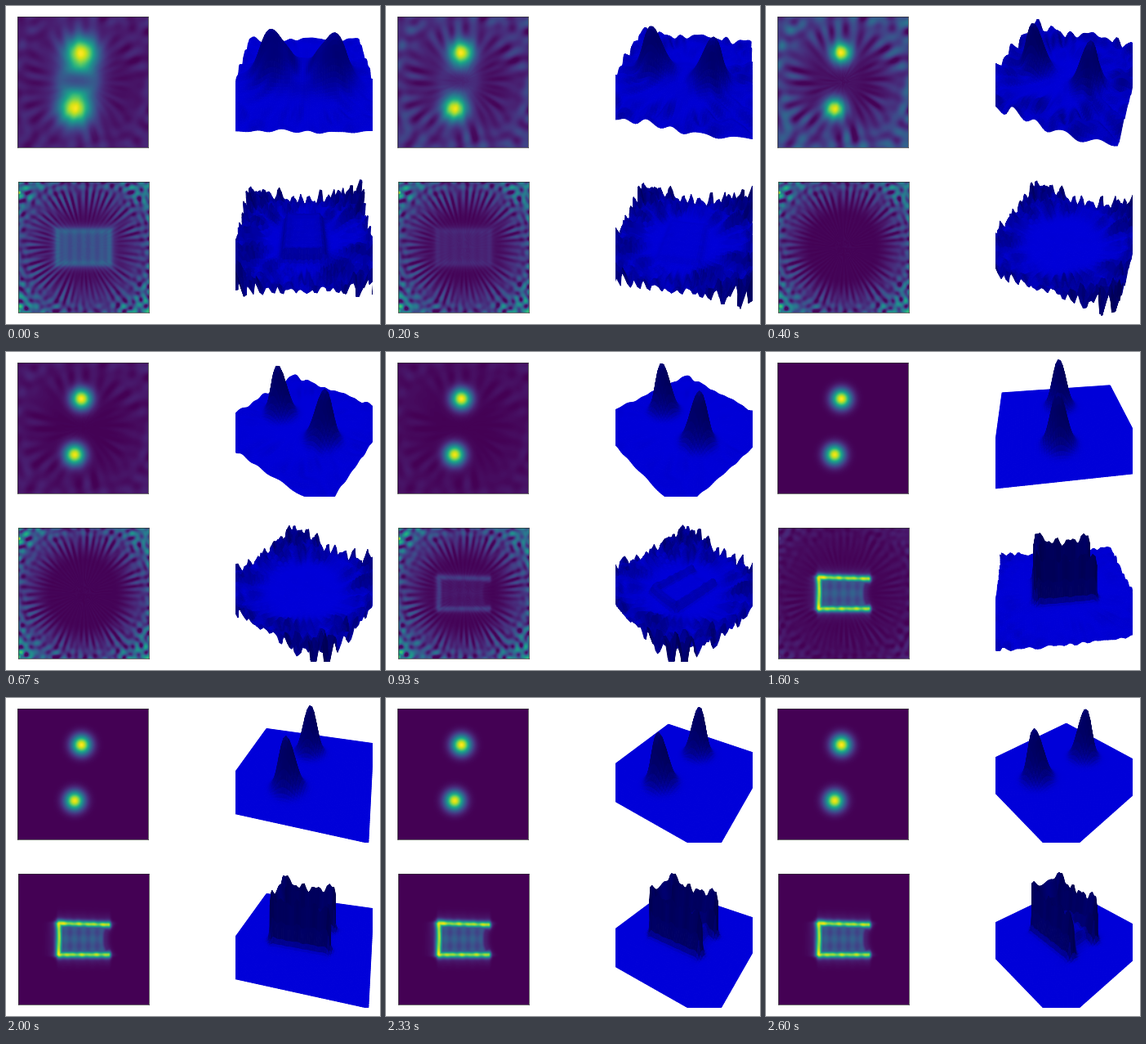
Animation of 458 by 389 pixels, one loop 2.67 s. Source, as a matplotlib script:

```python
import numpy as np
import matplotlib.pyplot as plt
from matplotlib.animation import FuncAnimation

W, H, DPI = 458, 389, 100
FRAMES, LOOP_MS = 40, 2670
TURN = np.radians(3.6)          # camera turn per frame
N = 129

axis = np.linspace(-1, 1, N)
P, Q = np.meshgrid(axis, axis)  # P to the right, Q downwards
R, PHI = np.hypot(P, Q), np.arctan2(Q, P)


def smooth(lo, hi, x):
    t = np.clip((x - lo) / (hi - lo), 0, 1)
    return t * t * (3 - 2 * t)


def bump(p, q, s):
    return np.exp(-((P - p) ** 2 + (Q - q) ** 2) / (2 * s * s))


def waves(rng, m_range, k_range, count=36):
    """Radial streaks that turn into round speckles near the corners."""
    rays, spots = np.zeros_like(P), np.zeros_like(P)
    for _ in range(count):
        m, ph = rng.integers(*m_range), rng.uniform(0, 2 * np.pi, 2)
        rays += np.cos(m * PHI + rng.uniform(-9, 9) * R + ph[0])
        k, d = rng.uniform(*k_range), rng.uniform(0, 2 * np.pi)
        spots += np.cos(k * (P * np.cos(d) + Q * np.sin(d)) + ph[1])
    mix = smooth(0.75, 1.15, R)
    return ((1 - mix) * rays + mix * spots) / np.sqrt(count / 2)


rng = np.random.default_rng(11)
coarse = [waves(rng, (14, 30), (14, 32)) for _ in range(2)]
fine = [waves(rng, (38, 58), (30, 58)) for _ in range(2)]


def drift(pair, i, contrast):
    a = 0.05 * i
    n = np.cos(a) * pair[0] + np.sin(a) * pair[1]
    return np.maximum(0.5 + contrast * n, 0.04)


def key(i, times, values):
    return np.interp(i, times, values)


def peaks_field(i):
    s = key(i, [0, 3, 6, 18], [0.17, 0.135, 0.118, 0.104])
    middle = key(i, [0, 3, 6, 10], [1, 0.4, 0.08, 0])
    level = key(i, [0, 6, 10, 18, 24], [0.17, 0.4, 0.1, 0.012, 0])
    z = bump(-0.02, -0.45, s) + 0.98 * bump(-0.125, 0.41, s)
    ring = np.hypot((P + 0.08) / 1.35, Q + 0.02)
    halo = np.exp(-((P + 0.07) / 0.4) ** 2 - (Q / 0.66) ** 2)
    z += middle * (0.3 * halo + 0.1 * np.exp(-((ring - 0.2) / 0.08) ** 2)
                   - 0.1 * np.exp(-(ring / 0.11) ** 2))
    z += level * (0.12 + smooth(0.3, 1.2, R)) * drift(coarse, i, 0.2)
    return z / z.max()


def line(d, s=0.034):
    return np.exp(-(d / s) ** 2 / 2) + 0.12 * np.exp(-(d / (3 * s)) ** 2 / 2)


RIPPLE = np.cos(2 * np.pi * P / 0.14)


def closed_box():
    """Faint full rectangle with a striped inside."""
    d = np.maximum(np.abs(P) - 0.41, np.abs(Q) - 0.265)
    inside = smooth(0.05, -0.05, d)
    return (0.13 + 0.025 * RIPPLE) * inside + 0.09 * line(d, 0.035) \
        + 0.1 * np.exp(-(np.maximum(d, 0) / 0.1) ** 2)


def open_box():
    """Bright bracket, open and notched at the right."""
    top, bottom = -0.245 + 0.03 * (P + 0.38), 0.24
    over = np.maximum(np.maximum(-0.38 - P, P - 0.39), 0)
    ends = np.exp(-(over / 0.035) ** 2)
    side = np.exp(-(np.maximum(np.abs(Q) - 0.24, 0) / 0.035) ** 2)
    jag = 0.83 + 0.05 * np.sin(31 * P + 9 * Q) + 0.04 * np.sin(53 * P - 17 * Q + 1)
    walls = np.maximum(line(Q - top), line(Q - bottom)) * ends
    walls = np.maximum(walls, line(P + 0.38) * side)
    notch = 0.4 - 0.09 * (1 - np.clip(Q / 0.24, -1, 1) ** 2)
    inside = smooth(-0.42, -0.36, P) * smooth(0.28, 0.22, np.abs(Q)) \
        * smooth(0.05, -0.05, P - notch)
    fill = (0.28 + 0.035 * RIPPLE + 0.03 * np.cos(30 * Q)) * inside
    glow = 0.1 * np.exp(-(np.maximum(P - notch, 0) / 0.08) ** 2) * side * (P > -0.38)
    corners = 0.22 * bump(-0.38, -0.245, 0.045) + 0.13 * bump(-0.38, 0.24, 0.045) \
        + 0.08 * bump(0.39, -0.22, 0.04)
    z = np.maximum(walls * jag, np.maximum(fill, glow)) + corners
    return z / z.max()


CLOSED, OPEN = closed_box(), open_box()
SPECKS = bump(-1, -0.84, 0.03) + 0.8 * bump(-1, 0.98, 0.03)


def box_field(i):
    faint = key(i, [0, 3, 6], [1, 0.35, 0])
    bright = key(i, [10, 14, 18, 21, 24], [0, 0.25, 0.68, 0.92, 1])
    level = key(i, [0, 15, 18, 21, 24, 28], [1, 1, 0.9, 0.4, 0.08, 0])
    inner = key(i, [0, 6, 12, 18], [0.3, 0.48, 0.48, 0.25])
    amp = 0.02 + 0.34 * smooth(inner, 1.1, R) + 0.45 * smooth(0.95, 1.4, R)
    noise = 0.85 * np.tanh(amp * drift(fine, i, 0.28) / 0.85)
    z = faint * CLOSED + bright * OPEN + level * np.maximum(noise, SPECKS)
    return z / z.max()


fig = plt.figure(figsize=(W / DPI, H / DPI), dpi=DPI, facecolor="white")


def add_axes(x, y, w, h):
    return fig.add_axes([x / W, 1 - (y + h) / H, w / W, h / H])


def image_axes(x, y):
    ax = add_axes(x, y, 160, 160)
    ax.set(xticks=[], yticks=[])
    for spine in ax.spines.values():
        spine.set(linewidth=0.5, color="#333333")
    return ax.imshow(np.zeros((N, N)), cmap="viridis", vmin=0, vmax=1,
                     interpolation="bilinear", aspect="auto")


def surface_axes(y):
    ax = add_axes(281, y, 168, 168)
    ax.set(xlim=(281, 449), ylim=(177, 9), autoscale_on=False)
    ax.axis("off")
    return ax


def draw_surface(ax, field, angle):
    z, p, q = field[::2, ::2], P[::2, ::2], Q[::2, ::2]
    c, s = np.cos(angle), np.sin(angle)
    across, depth = q * c + p * s, p * c - q * s
    w = 1 + 0.2164 * depth - 0.117 * z
    x = 365 + 80.6 * across / w
    y = 89 - (53.5 * depth + 54.5 * z) / w

    gq, gp = np.gradient(0.5 * z, axis[2] - axis[0])
    nz = 1 / np.sqrt(1 + gp ** 2 + gq ** 2)
    facing = -(gq * c + gp * s) * nz
    tone = (0.27 + 0.58 * nz - 0.04 * facing) * (1 - 0.3 * z)
    tone = (tone[1:, 1:] + tone[:-1, 1:] + tone[1:, :-1] + tone[:-1, :-1]) / 4

    # paint from far to near, deepest axis in the outer loop
    parts = [x, y, tone]
    if c > 0:
        parts = [a[:, ::-1] for a in parts]
    if abs(c) > abs(s):
        parts = [a.T for a in parts]
    x, y, tone = parts
    rgb = np.zeros(tone.shape + (3,))
    rgb[..., 2] = np.clip(tone, 0, 1)
    for old in list(ax.collections):
        old.remove()
    ax.pcolormesh(x, y, rgb, shading="flat", edgecolors="face",
                  linewidth=0.7, antialiased=True, snap=False)
    ax.set(xlim=(281, 449), ylim=(177, 9))


views = [
    (peaks_field, image_axes(14.4, 13), surface_axes(9)),
    (box_field, image_axes(14.8, 215), surface_axes(211)),
]


def update(i):
    for field_at, image, ax in views:
        field = field_at(i)
        image.set_data(field)
        draw_surface(ax, field, TURN * i)
    return []


ani = FuncAnimation(fig, update, frames=FRAMES, interval=LOOP_MS / FRAMES,
                    repeat=True, repeat_delay=0, blit=False)
plt.show()
```
